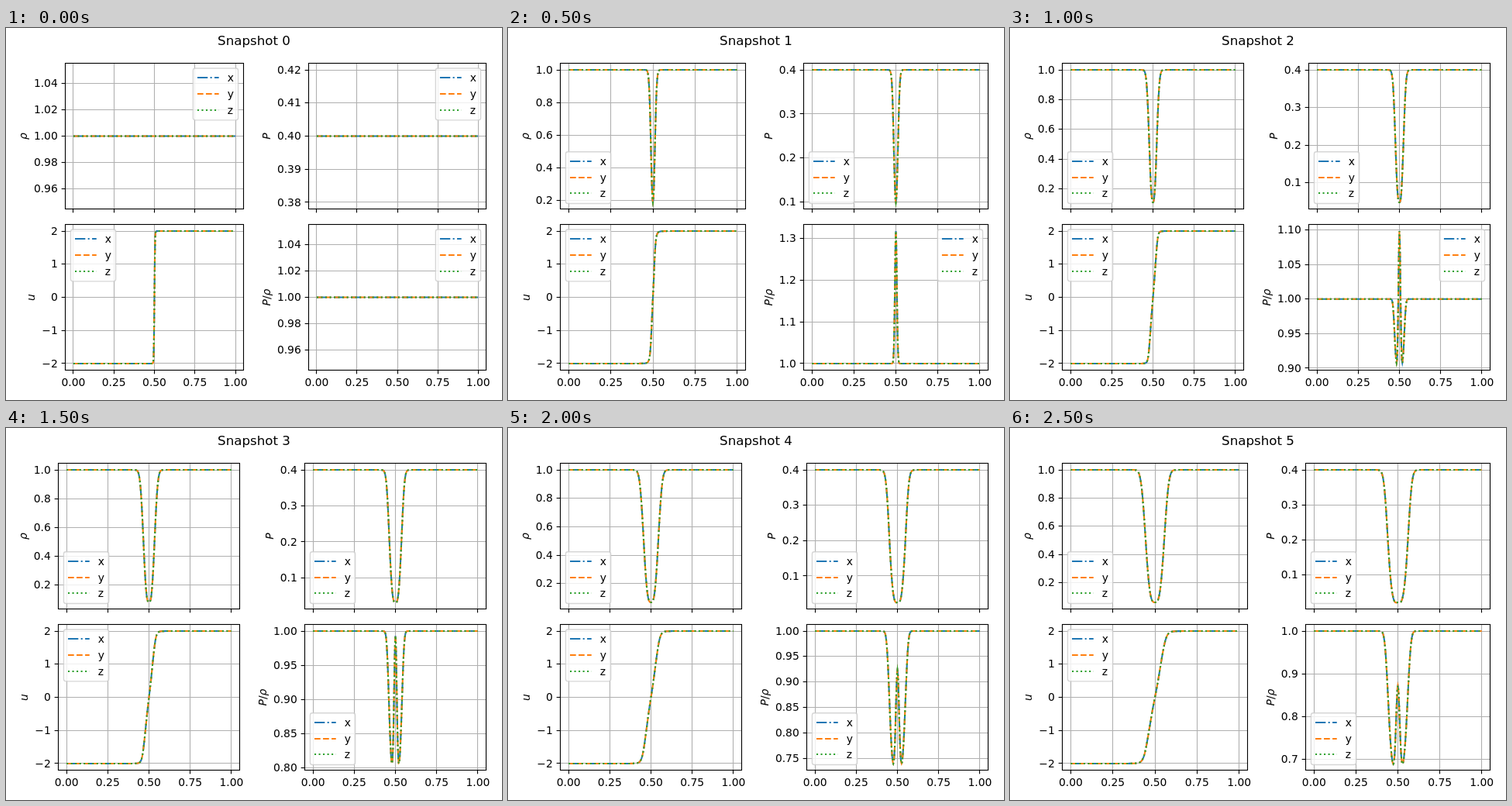
These frames come from a looping animation (640 px wide and 480 px high, 3000 ms). An HTML page with a canvas:

```html
<!DOCTYPE html>
<html lang="en">
<head>
<meta charset="utf-8">
<title>Snapshots</title>
<style>
html, body { margin: 0; width: 100%; height: 100%; overflow: hidden; background: #fff; }
canvas { display: block; }
</style>
</head>
<body>
<canvas id="stage" width="640" height="480"></canvas>
<script>
const ctx = document.getElementById('stage').getContext('2d');
const FONT = 13.89, LINE = 2.083, THIN = 1.11;
const HEIGHT = 188, TOPS = [45.5, 253.5];
const SERIES = [
  ['x', '#1f77b4', [13.33, 3.33, 2.08, 3.33]],
  ['y', '#ff7f0e', [7.71, 3.33]],
  ['z', '#2ca02c', [2.08, 3.44]],
];

// cols: panel edges; rho: lowest density; power: density well shape;
// temp: lowest and highest P/ρ; dip and peak: [depth, width] of the P/ρ profile
const WIDE = [[67.5, 306.5], [381.5, 619.5]];
const NARROW = [[67.5, 301.5], [385.5, 619.5]];
const SNAPSHOTS = [
  { cols: [[76.5, 306.5], [390.5, 619.5]], rho: 1, power: 2, temp: [0.95, 1.05], dip: [0, 1], peak: [0, 1], step: 0.02 },
  { cols: WIDE, rho: 0.189, power: 2.1, temp: [1, 1.318], dip: [0, 1], peak: [0.318, 0.0082], step: 0.1 },
  { cols: NARROW, rho: 0.11, power: 2.5, temp: [0.9067, 1.0985], dip: [0.1055, 0.0318], peak: [0.204, 0.0088], step: 0.05 },
  { cols: NARROW, rho: 0.0807, power: 2.8, temp: [0.8064, 1], dip: [0.2134, 0.0428], peak: [0.2064, 0.0115], step: 0.05 },
  { cols: NARROW, rho: 0.0687, power: 3, temp: [0.7397, 1], dip: [0.283, 0.0526], peak: [0.206, 0.014], step: 0.05 },
  { cols: WIDE, rho: 0.061, power: 3.2, temp: [0.69, 1], dip: [0.33, 0.063], peak: [0.202, 0.015], step: 0.1 },
];

const snap = v => Math.floor(v) + 0.5;
const bell = (d, width, power) => Math.exp(-Math.pow(Math.abs(d) / width, power));

function stroke(points, color, width, dash = []) {
  ctx.beginPath();
  for (const [x, y] of points) ctx.lineTo(x, y);
  ctx.strokeStyle = color;
  ctx.lineWidth = width;
  ctx.setLineDash(dash);
  ctx.stroke();
  ctx.setLineDash([]);
}

function text(str, x, y, align = 'left', size = FONT, style = '') {
  ctx.font = `${style} ${size}px "DejaVu Sans", sans-serif`;
  ctx.textAlign = align;
  ctx.fillStyle = '#000';
  ctx.fillText(str, x, y);
  return ctx.measureText(str).width;
}

// Rotated axis label: italic letters, upright slash
function sideLabel(str, x, y) {
  const style = c => c === '/' ? 'normal' : 'italic';
  let width = 0;
  for (const c of str) {
    ctx.font = `${style(c)} ${FONT}px "DejaVu Sans", sans-serif`;
    width += ctx.measureText(c).width;
  }
  ctx.save();
  ctx.translate(x, y);
  ctx.rotate(-Math.PI / 2);
  let pos = -width / 2;
  for (const c of str) pos += text(c, pos, 0, 'left', FONT, style(c));
  ctx.restore();
}

function legend(corner, left, right, top) {
  const w = 58.2, h = 66.8, gap = 6.94;
  const x = corner[1] === 'R' ? right - gap - w : left + gap;
  const y = corner[0] === 'U' ? top + gap - 0.4 : top + HEIGHT - gap - h;
  ctx.globalAlpha = 0.8;
  ctx.beginPath();
  ctx.roundRect(x, y, w, h, 2.8);
  ctx.fillStyle = '#fff';
  ctx.fill();
  ctx.strokeStyle = '#ccc';
  ctx.lineWidth = 1.39;
  ctx.stroke();
  ctx.globalAlpha = 1;
  SERIES.forEach(([name, color, dash], i) => {
    const row = Math.round(y + 12 + i * 20.75);
    stroke([[x + 5.56, row], [x + 33.3, row]], color, LINE, dash);
    text(name, x + 44.4, row + 5);
  });
}

function panel(cols, index, { label, range: [lo, hi], step, digits, corner, f }) {
  const [left, right] = cols[index % 2];
  const top = TOPS[index >> 1], bottom = top + HEIGHT;
  const pad = (hi - lo) * 0.05, min = lo - pad, max = hi + pad;
  const px = x => left + (right - left) * (x + 0.05) / 1.1;
  const py = y => bottom - HEIGHT * (y - min) / (max - min);
  const xTicks = [0, 0.25, 0.5, 0.75, 1];
  const yTicks = [];
  for (let i = Math.ceil(min / step); i * step <= max; i++) yTicks.push(i * step);

  for (const t of xTicks) {
    const x = snap(px(t));
    stroke([[x, top], [x, bottom]], '#b0b0b0', THIN);
    stroke([[x, bottom], [x, bottom + 4.86]], '#000', THIN);
    if (index > 1) text(t.toFixed(2), px(t), 462, 'center');
  }
  let labelWidth = 0;
  for (const t of yTicks) {
    const y = snap(py(t));
    stroke([[left, y], [right, y]], '#b0b0b0', THIN);
    stroke([[left - 4.86, y], [left, y]], '#000', THIN);
    const width = text(t.toFixed(digits).replace('-', '−'), left - 9.72, Math.round(py(t) + 4.6), 'right');
    labelWidth = Math.max(labelWidth, width);
  }
  sideLabel(label, left - 18.6 - labelWidth, top + HEIGHT / 2);

  const curve = [];
  for (let i = 0; i <= 400; i++) curve.push([px(i / 400), py(f(i / 400 - 0.5))]);
  for (const [, color, dash] of SERIES) stroke(curve, color, LINE, dash);

  ctx.strokeStyle = '#000';
  ctx.lineWidth = THIN;
  ctx.strokeRect(left, top, right - left, HEIGHT);
  legend(corner, left, right, top);
}

function draw(k) {
  const s = SNAPSHOTS[k], first = k === 0;
  const density = d => 1 - (1 - s.rho) * bell(d, (0.0027 + 0.0108 * k) / Math.pow(Math.LN2, 1 / s.power), s.power);
  const ratio = d => 1 - s.dip[0] * bell(d, s.dip[1], 4) + s.peak[0] * bell(d, s.peak[1], 2);
  const pressure = d => 0.4 * density(d) * ratio(d);
  const velocity = d => {
    const r = d / (0.004 + 0.0128 * k), n = k < 2 ? 4 : 7;
    return 2 * r * (1 - 0.12 * bell(r, 0.4, 2)) / Math.pow(1 + Math.pow(Math.abs(r), n), 1 / n);
  };
  const corner = first ? 'UR' : 'LL';

  ctx.fillStyle = '#fff';
  ctx.fillRect(0, 0, 640, 480);
  text(`Snapshot ${k}`, 320, 22, 'center', 16.67);
  [
    { label: 'ρ', range: first ? [0.95, 1.05] : [s.rho, 1], step: first ? 0.02 : 0.2, digits: first ? 2 : 1, corner, f: density },
    { label: 'P', range: first ? [0.38, 0.42] : [pressure(0), 0.4], step: first ? 0.01 : 0.1, digits: first ? 2 : 1, corner, f: pressure },
    { label: 'u', range: [-2, 2], step: 1, digits: 0, corner: 'UL', f: velocity },
    { label: 'P/ρ', range: s.temp, step: s.step, digits: s.step === 0.1 ? 1 : 2, corner: k < 3 ? 'UR' : 'LL', f: ratio },
  ].forEach((p, i) => panel(s.cols, i, p));
}

let shown = -1;
function tick() {
  const k = Math.floor(performance.now() % 3000 / 500);
  if (k !== shown) draw(shown = k);
  requestAnimationFrame(tick);
}
tick();
</script>
</body>
</html>
```
